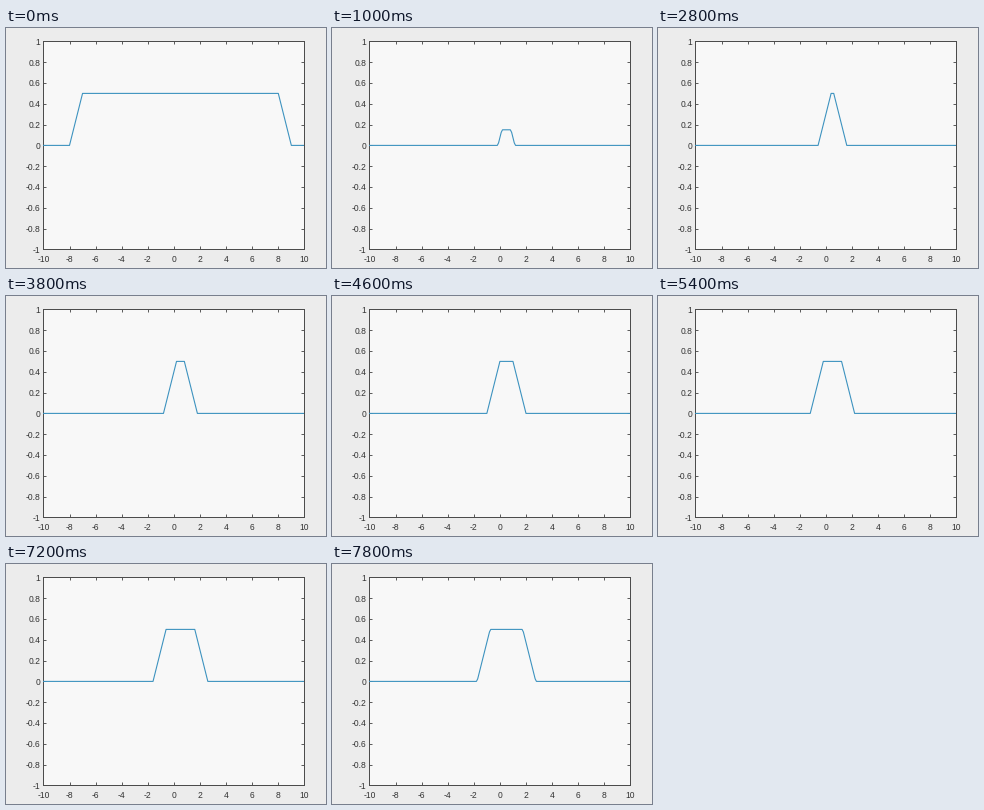
These frames come from a looping animation (320 by 240 pixels, 8 s). A matplotlib script:

```python
import numpy as np
import matplotlib.pyplot as plt
from matplotlib.animation import FuncAnimation

W, H, DPI = 320, 240, 72
STEP_MS, FRAMES = 200, 40
LEFT, RIGHT, TOP, BOTTOM = 37.4, 298.4, 13.4, 221.4
INK, FRAME, BLUE = "#333333", "#4c4c4c", "#3c92bf"

plt.rcParams["font.family"] = "Liberation Sans"

x = np.linspace(-10, 10, 201)


def wave(t):
    """d'Alembert solution for a unit velocity pulse on [0, 1]."""
    overlap = np.minimum(x + t, 1) - np.maximum(x - t, 0)
    return 0.5 * np.clip(overlap, 0, None)


# Wave time per frame: the previous run's end, then steps of 0.05 with holds.
# Each hold maps to the extra time caught up when the motion resumes.
HOLDS = {4: 0.05, 17: 0.0, 33: 0.0, 34: 0.05}
times = [8.0, 8.0, 0.0]
skipped = 0.0
for i in range(3, FRAMES):
    if i in HOLDS:
        times.append(times[-1])
        skipped += HOLDS[i]
    else:
        times.append(times[-1] + 0.05 + skipped)
        skipped = 0.0

fig = plt.figure(figsize=(W / DPI, H / DPI), dpi=DPI, facecolor="#ececec")
ax = fig.add_axes([LEFT / W, 1 - BOTTOM / H,
                   (RIGHT - LEFT) / W, (BOTTOM - TOP) / H])
ax.set_facecolor("#f8f8f8")
ax.set(xlim=(-10, 10), ylim=(-1, 1))

xticks = np.arange(-10, 11, 2)
yticks = np.arange(-5, 6) / 5
ax.set_xticks(xticks, [f"{v:g}" for v in xticks])
ax.set_yticks(yticks, [f"{v:g}" for v in yticks])
ax.tick_params(direction="in", length=3, width=0.9, pad=3, top=True,
               right=True, color=FRAME, labelcolor=INK, labelsize=8.5)
ax.tick_params(axis="x", pad=5.5)
for spine in ax.spines.values():
    spine.set(color=FRAME, linewidth=1)

line, = ax.plot(x, wave(times[0]), color=BLUE, lw=1.1, zorder=3)


def update(i):
    line.set_ydata(wave(times[i]))
    return line,


anim = FuncAnimation(fig, update, frames=FRAMES, interval=STEP_MS,
                     repeat=True, repeat_delay=0)
plt.show()
```
